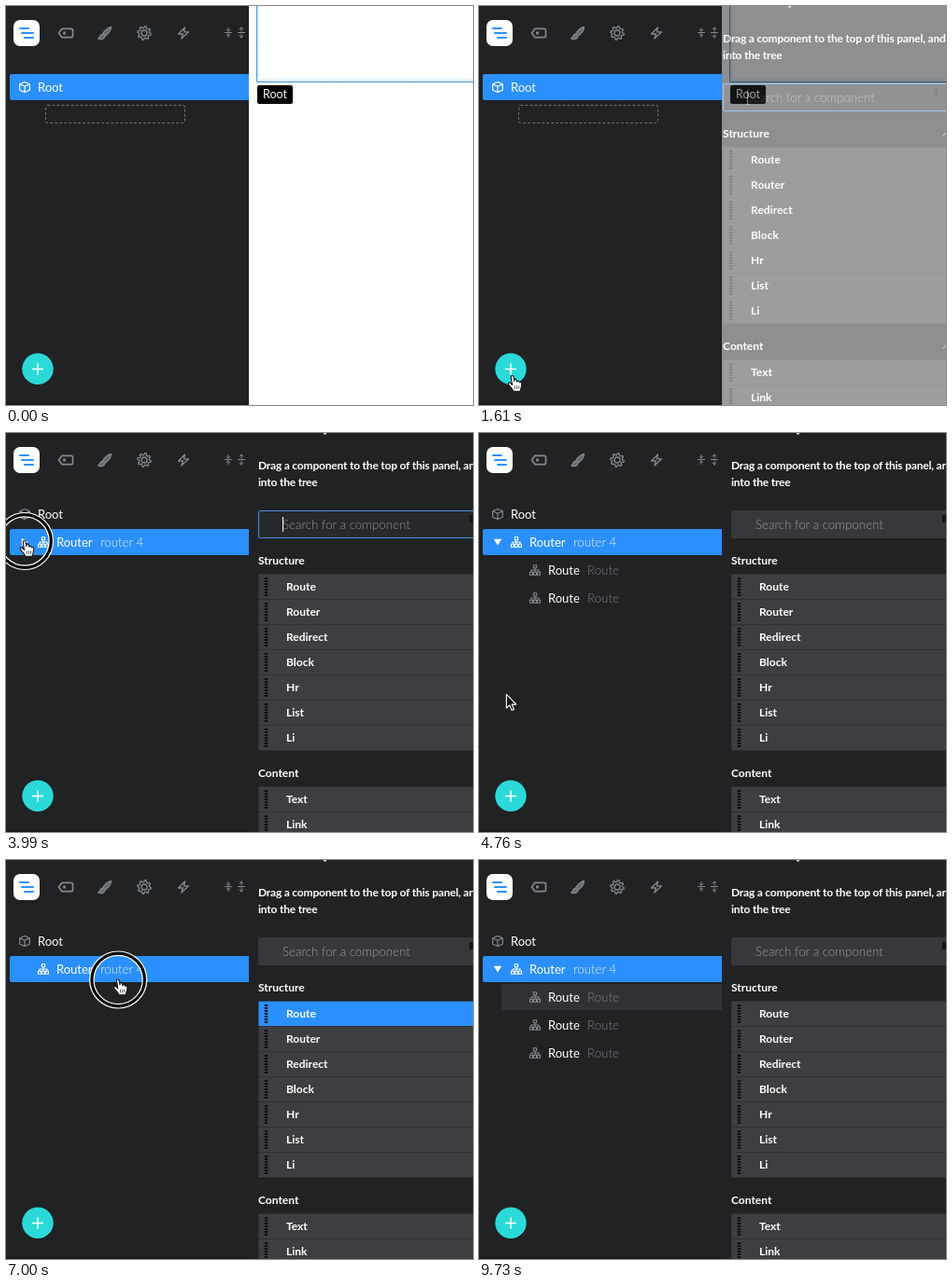
Recreate the animation shown at these times as an HTML page. Size 500x428 px, loop 9800 ms.

```html
<!DOCTYPE html>
<html lang="en">
<head>
<meta charset="utf-8">
<title>Component tree</title>
<style>
html, body { margin: 0; width: 100%; height: 100%; overflow: hidden; background: #202224; }
svg { display: block; width: 100%; height: 100%; font: 13px Lato, sans-serif; }
.b { font-weight: 700; font-size: 12px; fill: #fff; }
.tight { letter-spacing: -.2px; }
.l { font-weight: 300; font-size: 13.3px; }
.line { fill: none; stroke: #85888c; stroke-width: 1.3; stroke-linejoin: round; stroke-linecap: round; }
</style>
</head>
<body>
<svg viewBox="0 0 500 428" preserveAspectRatio="none">
  <defs>
    <linearGradient id="edge"><stop stop-color="#d3e6f6"/><stop offset="1" stop-color="#fff"/></linearGradient>
    <linearGradient id="foot" x1="0" x2="0" y1="1" y2="0"><stop stop-color="#d3e6f6"/><stop offset="1" stop-color="#fff"/></linearGradient>
    <clipPath id="sideBox"><rect width="260" height="428"/></clipPath>
    <g id="cube" fill="none" stroke="currentColor" stroke-width="1.2" stroke-linejoin="round">
      <path d="M0-5.5L5.3-3.2V3.2L0 5.5L-5.3 3.2V-3.2ZM-5.3-3.2L0-.8L5.3-3.2M0-.8V5.5"/>
    </g>
    <g id="net" fill="none" stroke="currentColor" stroke-width="1.1">
      <path d="M-1.6-5.2h3.2v3h-3.2zM-5.5 2.2h3v3h-3zM-1.5 2.2h3v3h-3zM2.5 2.2h3v3h-3zM0-2.2V2.2M-4 2.2V0H4V2.2"/>
    </g>
  </defs>

  <g id="page">
    <rect x="260" width="240" height="428" fill="#fff"/>
    <rect x="269" width="4" height="81" fill="url(#edge)"/>
    <rect x="269" y="77" width="231" height="4" fill="url(#foot)"/>
    <path d="M268.5 0V81.5H500" fill="none" stroke="#4a97d2"/>
    <rect x="269" y="85" width="38" height="20" rx="2" fill="#000"/>
    <text x="275" y="99" font-size="12.5" fill="#fff">Root</text>
  </g>

  <g id="panel">
    <rect x="255" width="300" height="428" fill="#202224"/>
    <rect x="340" width="3" height="1.5" fill="#ddd"/>
    <text class="b tight" x="270" y="39">Drag a component to the top of this panel, and drop it</text>
    <text class="b tight" x="270" y="57">into the tree</text>
    <rect id="search" x="270.5" y="83.5" width="260" height="29" rx="1"/>
    <text id="hint" class="l" x="296" y="103">Search for a component</text>
    <path id="caret" d="M296.5 90V106" stroke="#fff"/>
    <rect x="496" y="88" width="4" height="8" fill="#151617"/>
    <text class="b" x="270" y="141">Structure</text>
    <text class="b" x="270" y="369">Content</text>
    <path class="line" d="M506 139l4-4l4 4M506 367l4-4l4 4"/>
    <g id="list"></g>
  </g>

  <g id="side" clip-path="url(#sideBox)">
    <rect width="260" height="428" fill="#202224"/>
    <rect x="8" y="15" width="28" height="28" rx="7" fill="#fff"/>
    <path d="M15 24H24M17 29H29M20 34H29" stroke="#2b90ff" stroke-width="2" stroke-linecap="round"/>
    <g class="line">
      <path stroke-width="1.7" d="M60 24.3H69.5Q71.5 24.3 71.5 26V32Q71.5 33.7 69.5 33.7H60L56.5 29Z"/>
      <circle cx="62.5" cy="29" r="1"/>
      <path d="M112.5 22.5C109 23 105 27 103.5 30L106 32.3C109 30 112.5 26 112.5 22.5ZM103.3 30.5C100 30.5 101.5 34 98.5 35C102 36 105.5 35.5 105.8 32.5" fill="#65686c"/>
      <path id="gear"/>
      <circle cx="148" cy="29" r="3"/>
      <path d="M191.5 23L184.5 30H189.5L187.8 35L195.5 27.8H190.5Z"/>
      <path stroke-width="1" d="M234.5 28.5H241.5M238 23.5V27M236.3 25.5L238 27.2L239.7 25.5M238 33.5V30M236.3 31.5L238 29.8L239.7 31.5M248.5 28.5H255.5M252 23V27M250 25L252 23L254 25M252 34V30M250 32L252 34L254 32"/>
    </g>
    <rect id="slot" x="42.5" y="106.5" width="149" height="19" rx="2" fill="none" stroke="#6f7275" stroke-dasharray="3 2"/>
    <g id="tree"></g>
    <path id="fold" d="M-4.2-3.2H4.2L0 3.6Z" fill="#fff"/>
    <circle cx="34" cy="389.3" r="16.7" fill="#2bdad8"/>
    <path d="M28 389.5H40M34 383.5V395.5" stroke="#fff" stroke-width="1.6"/>
    <rect y="426" width="260" height="2" fill="#18191b"/>
  </g>

  <g id="ring" fill="none">
    <circle r="28.3" stroke="#fff" stroke-width="5.6"/>
    <circle r="28.3" stroke="#000" stroke-width="3.2"/>
  </g>
  <g id="pointer" stroke-linejoin="round">
    <path id="arrow" d="M0 0V14.5L3.4 11.4L5.8 17L8.2 16L5.8 10.6H10.5Z" fill="#141414" stroke="#fff" stroke-width="1.1"/>
    <g id="hand" transform="scale(1.08)">
      <path d="M-1.6.8C-1.6-.8.8-.8 1 .8L1.7 5C2-.2 4.2 4 4.3 5.5C5 4.3 6.7 4.8 6.8 6.3C8 5.5 9 6.4 9 7.6C9.2 10.5 8 12 7.6 15H.6C.2 12.5-2.6 11-4.2 8C-4.8 6.4-3 5.8-1.8 7.2L-.4 8.8Z" fill="#fff" stroke="#111"/>
      <path d="M2.2 9.5V12.8M4.2 9.5V12.8M6.2 9.5V12.8" stroke="#222" stroke-width=".7"/>
    </g>
  </g>
</svg>
<script>
const LOOP = 9800, BLUE = '#2b90ff';
const $ = id => document.getElementById(id);
const set = (el, attrs) => { for (const k in attrs) el.setAttribute(k, attrs[k]); };
const show = (el, on) => { el.style.display = on ? '' : 'none'; };
const clamp = v => Math.max(0, Math.min(1, v));
const ease = p => p * p * (3 - 2 * p);

const gearPoints = Array.from({ length: 32 }, (_, i) => {
  const a = (i + 0.5) * Math.PI / 16, r = i % 4 < 2 ? 7.3 : 5.4;
  return (148 + r * Math.cos(a)).toFixed(1) + ' ' + (29 + r * Math.sin(a)).toFixed(1);
});
set($('gear'), { d: 'M' + gearPoints.join('L') + 'Z' });

// Component list
const items = ['Route', 'Router', 'Redirect', 'Block', 'Hr', 'List', 'Li', 'Text', 'Link']
  .map((name, i) => ({ name, y: 152 + 27 * i + (i > 6 ? 39 : 0) }));
$('list').innerHTML = items.map(({ name, y }) => `
  <rect x="270" y="${y - 1}" width="270" height="28" fill="#2b2c2e"/>
  <rect class="cell" x="270.5" y="${y - 0.3}" width="270" height="26.5"/>
  <path d="M278.5 ${y + 3}V${y + 24}" stroke="#0d0e0f" stroke-width="3.4" stroke-dasharray="2 1"/>
  <text class="b" x="300" y="${y + 17}">${name}</text>`).join('');
const cells = [...document.querySelectorAll('.cell')];

// Tree rows
const nodes = [['Root', '', 0], ['Router', 'router 4', 1], ...Array(3).fill(['Route', 'Route', 2])];
$('tree').innerHTML = nodes.map(([name, note, depth], i) => {
  const x = 20 * depth, y = 73 + 30 * i, left = depth > 1 ? 24 : 4;
  return `<g><rect x="${left}" y="${y}" width="270" height="28" rx="2"/>
    <use href="#${i ? 'net' : 'cube'}" x="${20 + x}" y="${y + 14}"/>
    <text x="${34 + x}" y="${y + 19}" fill="#fff">${name}</text>
    <text class="l" x="${i === 1 ? 101 : 116}" y="${y + 19}">${note}</text></g>`;
}).join('');
const rows = [...$('tree').children].map(el => {
  const [back, icon, , note] = el.children;
  return { el, back, icon, note };
});

// Places the pointer visits
const plus = [36, 397], fold = [20, 116], node = [62, 120];
const shelf = i => [350 + 48 * i, 162 + 27 * i];

// Pointer moves; a move with an item drags it along
const move = (from, to, place, item = -1) => ({ from, to, place, item });
const moves = [
  move(70, 840, plus),
  move(1750, 2240, shelf(1)),
  move(2480, 3300, node, 1),
  move(3450, 3850, fold),
  move(4410, 5040, plus),
  move(5200, 5460, [160, 150]),
  move(5809, 5810, [183, 191]),
  move(5820, 6350, shelf(0)),
  move(6560, 7180, node, 0),
  move(7350, 7630, shelf(0)),
  move(7770, 8050, node, 0),
  move(8120, 8260, shelf(0)),
  move(8620, 8880, node, 0),
  move(9060, 9680, [470, 440])
];
const drags = moves.filter(m => m.item >= 0);
const drops = drags.map(m => m.to + 70);
const unfolded = 4060, cut = 5810;
const presses = [[1260, 1400], [3890, unfolded], ...drags.map(m => [m.from - 120, m.to])];

function pointerAt(t) {
  return moves.reduce(([x, y], { from, to, place }) => {
    const p = ease(clamp((t - from) / (to - from)));
    return [x + (place[0] - x) * p, y + (place[1] - y) * p];
  }, [300, 18]);
}

function drawTree(t, x, y) {
  const dropped = drops.filter(d => t >= d).length;
  const kids = t >= cut ? dropped - 1 : t >= unfolded ? 2 : 0;
  const picked = dropped ? 1 : 0, count = dropped ? 2 + kids : 1;
  const over = x < 260 ? Math.floor((y - 72) / 30) : -1;
  rows.forEach(({ el, back, icon, note }, i) => {
    const on = i === picked;
    const lit = i > 1 && i === (t < cut ? over : 2);
    show(el, i < count);
    set(back, { fill: on ? BLUE : lit ? '#303136' : 'none' });
    set(icon, { color: on ? '#fff' : '#85888c' });
    set(note, { fill: on ? '#e6f2ff' : '#7c7f83' });
  });
  show($('slot'), !dropped);
  show($('fold'), kids > 0 || dropped && t < unfolded);
  set($('fold'), { transform: `translate(20 117) rotate(${kids ? 0 : -90})` });
  return over >= 0 && over < count;
}

function drawPanel(t, x, y) {
  const open = clamp((t - 1470) / 280), focused = t < 4270;
  set($('panel'), { opacity: open, transform: `translate(${-18 * (1 - open)} 0)` });
  set($('search'), { fill: focused ? '#26282b' : '#37383b', stroke: focused ? '#4a90e2' : '#37383b' });
  set($('hint'), { fill: focused ? '#919396' : '#9a9c9f' });
  show($('caret'), focused && t >= 1500 && (t - 1500) % 1000 < 500);
  const drag = drags.find(m => t >= m.from && t < m.to);
  const over = drag ? drag.item : open < 1 || x < 270 ? -1
    : items.findIndex(it => y >= it.y && y < it.y + 27);
  cells.forEach((c, i) => set(c, { fill: i === over ? BLUE : '#3d3e41' }));
  return over >= 0;
}

function drawPointer(t, x, y, link) {
  const transform = `translate(${x} ${y})`;
  set($('pointer'), { transform });
  show($('pointer'), t >= 70 && t < 9700);
  show($('arrow'), !link);
  show($('hand'), link);
  const opacity = Math.max(...presses.map(([a, b]) => clamp(Math.min(t - a, b + 80 - t) / 80)));
  set($('ring'), { transform, opacity });
}

function draw(t) {
  const [x, y] = pointerAt(t);
  const onTree = drawTree(t, x, y), onList = drawPanel(t, x, y);
  const onButton = Math.hypot(x - 34, y - 389) < 17;
  drawPointer(t, x, y, onTree || onList || onButton);
}

const start = performance.now();
function tick() {
  draw((performance.now() - start) % LOOP);
  requestAnimationFrame(tick);
}
tick();
</script>
</body>
</html>
```
